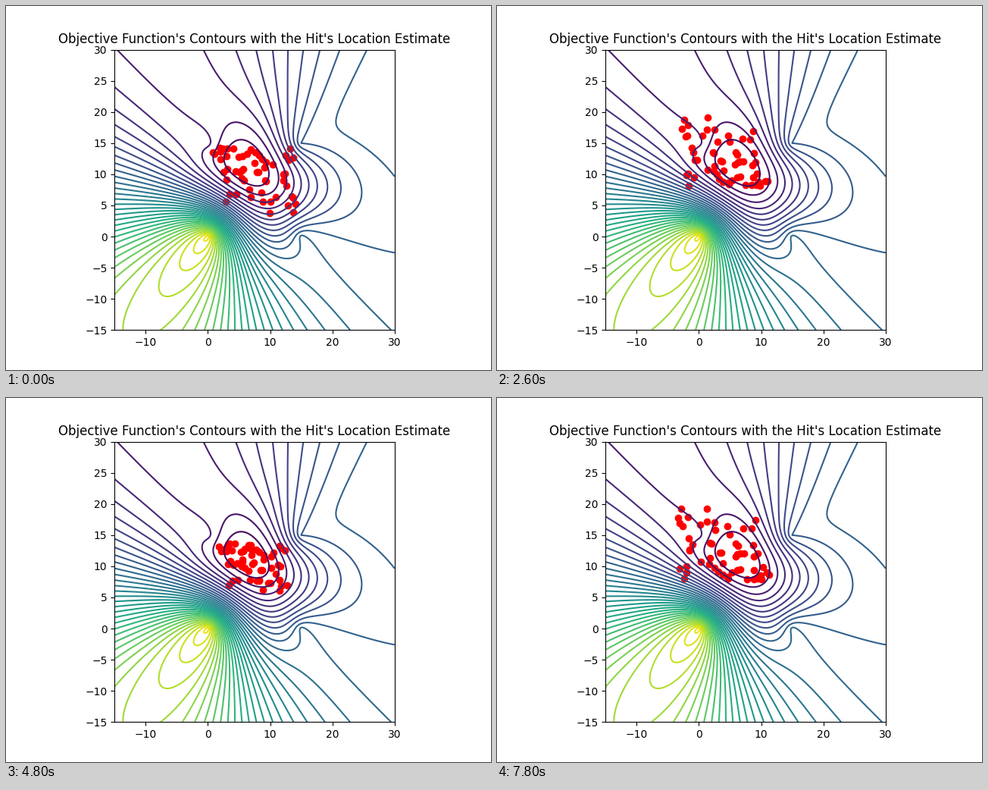
Write a matplotlib script that moves like this. It is 640 by 480 pixels and loops after 8 s.

```python
import numpy as np
import matplotlib.pyplot as plt
from matplotlib.animation import FuncAnimation

FRAMES, STEP_MS = 40, 200
LOW, HIGH = -15, 30

SENSORS = [(0, 0), (15, 0), (15, 15), (0, 15)]
RANGE_DIFFS = (1.8, -4.0, -5.75)  # measured relative to the first sensor
LEVEL_STEP = 36

PARTICLES = 57
BEST = np.array([5.8, 11.2])
TURNS = (0, 11, 28, 39)  # frames where the swarm swings back


def objective(x, y):
    d = [np.hypot(x - sx, y - sy) for sx, sy in SENSORS]
    return sum((di - d[0] - m) ** 2 for di, m in zip(d[1:], RANGE_DIFFS))


def make_offsets(rng):
    """Offsets from the best point when the swarm is at its lower turn."""
    depth = 10.5 * rng.random(PARTICLES) ** 1.5
    left = -5.3 + 0.25 * depth
    x = left + (8.6 - left) * rng.random(PARTICLES) ** 1.2
    return np.column_stack([x, 3 - depth])


def swing(t):
    """Ease between +1 (lower turn) and -1 (upper turn)."""
    return np.cos(np.pi * np.interp(t, TURNS, range(len(TURNS))))


rng = np.random.default_rng(7)
offsets = make_offsets(rng)
delay = rng.normal(0, 0.7, PARTICLES)
wobble = rng.uniform(0, 2 * np.pi, offsets.shape)


def swarm(i):
    w = swing(i - delay)[:, None]
    reach = np.where(w > 0, 1, 1.1) * w
    drift = 0.7 * (1 - abs(w)) * np.sin(wobble + 1.1 * i)
    return BEST + reach * offsets + drift


fig, ax = plt.subplots(figsize=(6.4, 4.8), dpi=100)
axis = np.linspace(LOW, HIGH, 301)
X, Y = np.meshgrid(axis, axis)
levels = LEVEL_STEP * np.arange(1, 35)
ax.contour(X, Y, objective(X, Y), levels=levels, vmin=0,
           vmax=35 * LEVEL_STEP, cmap="viridis", zorder=2)
dots = ax.scatter(*swarm(0).T, c="red", zorder=1)

ax.set_aspect("equal", adjustable="box")
ax.set_xlim(LOW, HIGH)
ax.set_ylim(LOW, HIGH)
ax.set_xticks(range(-10, 31, 10))
ax.set_yticks(range(-15, 31, 5))
ax.set_title("Objective Function's Contours with the Hit's Location Estimate")


def update(i):
    dots.set_offsets(swarm(i))
    return (dots,)


anim = FuncAnimation(fig, update, frames=FRAMES, interval=STEP_MS,
                     repeat=True, repeat_delay=0)
plt.show()
```
